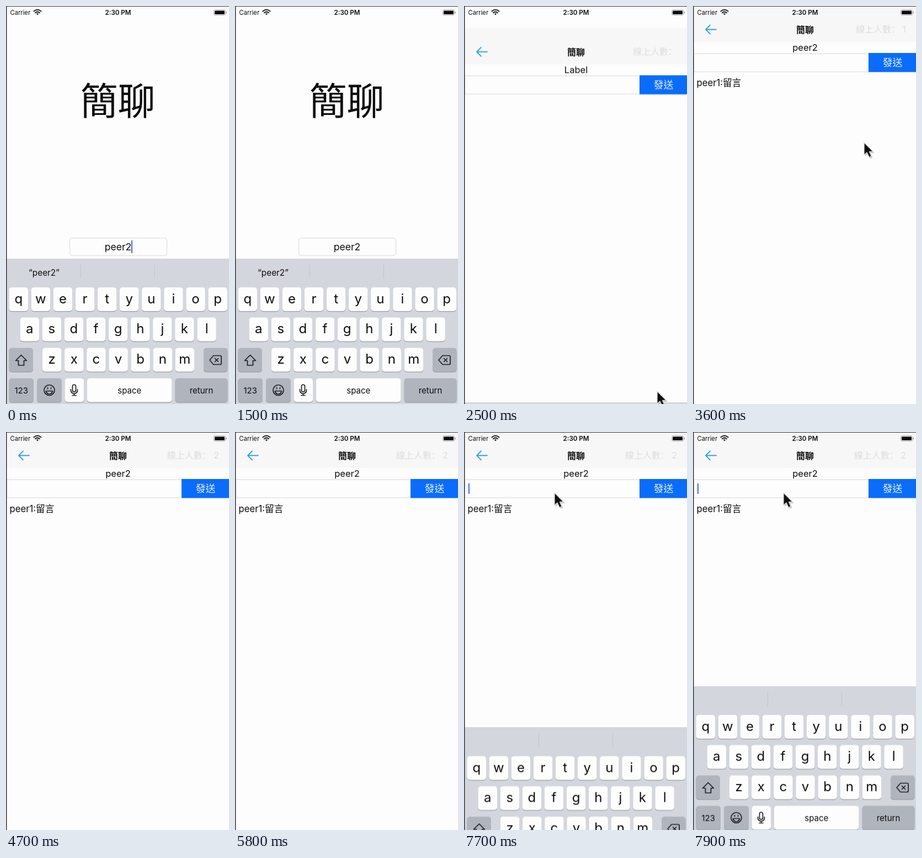
An HTML page for the animation above (8 s loop, 404x720 px).

```html
<!DOCTYPE html>
<html lang="zh-Hant">
<head>
<meta charset="utf-8">
<title>Chat demo</title>
<style>
  html, body { margin: 0; width: 100%; height: 100%; overflow: hidden; background: #fdfdfd; }
  svg { display: block; width: 100vw; height: 100vh; }
  text { font-family: Inter, "Noto Sans CJK TC", "Noto Sans CJK", sans-serif; fill: #0c0c0e; }
  .mid { text-anchor: middle; }
  .paper { fill: #fdfdfd; }
  .field { fill: #fdfdfd; stroke: #e4e4e8; stroke-width: 1.5; }
  .caret { fill: #4a66dc; }
  .line { fill: none; stroke: #1c1d20; stroke-width: 1.7; stroke-linecap: round; stroke-linejoin: round; }
  .count { font-family: Inter, "Noto Sans CJK SC", "Noto Sans CJK", sans-serif; font-size: 16px; text-anchor: end; fill: #dddde0; }

  /* One shared 8 s clock */
  .anim { animation: 8s linear infinite; }
  .step { animation: 8s step-end infinite; }
  #page { animation-name: page; }
  #keyboard { animation-name: keyboard; }
  #pointer { animation-name: pointer; }
  #hint { animation-name: hint; }
  #label { animation-name: until-joined; }
  #name { animation-name: after-joined; }
  #message { animation-name: message; }
  #count0 { animation-name: until-joined; }
  #count1 { animation-name: one-online; }
  #count2 { animation-name: two-online; }
  #chatCaret { animation-name: focused; }
  #loginCaret { animation: blink 1s step-end infinite; }

  @keyframes page {
    0%, 27.25% { transform: translateY(720px); animation-timing-function: cubic-bezier(.333, 1, .667, 1); }
    33.75%, 100% { transform: translateY(0); }
  }
  @keyframes keyboard {
    0%, 27.25% { transform: translateY(0); animation-timing-function: cubic-bezier(.333, 1, .667, 1); }
    32.625% { transform: translateY(264px); }
    94.375% { transform: translateY(264px); animation-timing-function: cubic-bezier(.333, 1, .667, 1); }
    100% { transform: translateY(0); }
  }
  @keyframes pointer {
    0%, 20% { transform: translate(420px, 560px); animation-timing-function: ease-out; }
    23.75%, 32.5% { transform: translate(350px, 697px); animation-timing-function: ease-in-out; }
    45% { transform: translate(310px, 247px); animation-timing-function: ease-in; }
    50% { transform: translate(420px, 200px); }
    81.25% { transform: translate(420px, 190px); animation-timing-function: ease-out; }
    87.5%, 100% { transform: translate(164px, 110px); }
  }
  @keyframes hint { 0% { opacity: 1; } 33%, 100% { opacity: 0; } }
  @keyframes until-joined { 0% { opacity: 1; } 35%, 100% { opacity: 0; } }
  @keyframes after-joined { 0% { opacity: 0; } 35%, 100% { opacity: 1; } }
  @keyframes message { 0% { opacity: 0; } 36.25%, 100% { opacity: 1; } }
  @keyframes one-online { 0% { opacity: 0; } 35% { opacity: 1; } 57.5%, 100% { opacity: 0; } }
  @keyframes two-online { 0% { opacity: 0; } 57.5%, 100% { opacity: 1; } }
  @keyframes focused { 0% { opacity: 0; } 94.375%, 100% { opacity: 1; } }
  @keyframes blink { 0% { opacity: 1; } 50%, 100% { opacity: 0; } }
</style>
</head>
<body>
<svg viewBox="0 0 404 720" preserveAspectRatio="none">
  <rect class="paper" width="404" height="720"/>

  <g id="login">
    <text class="mid" x="202.5" y="197" font-size="68" font-weight="500">簡聊</text>
    <rect class="field" x="115.5" y="419.5" width="176" height="32" rx="5"/>
    <text class="mid" x="203" y="442" font-size="17.5">peer2</text>
    <rect id="loginCaret" class="caret" x="227" y="424" width="2" height="23"/>
  </g>

  <g id="page" class="anim">
    <rect class="paper" width="404" height="720"/>
    <rect width="404" height="65" fill="#f7f7f8"/>
    <path d="M42 42.5H23M31 34.5L23 42.5L31 50.5" fill="none" stroke="#35a0dc" stroke-width="1.8" stroke-linecap="round" stroke-linejoin="round"/>
    <text class="mid" x="203" y="48.5" font-size="16" font-weight="700">簡聊</text>
    <g lang="zh-Hans">
      <text id="count0" class="count step" x="386" y="48">線上人數：</text>
      <text id="count1" class="count step" x="386" y="48">線上人數： 1</text>
      <text id="count2" class="count step" x="386" y="48">線上人數： 2</text>
    </g>
    <text id="label" class="mid step" x="203" y="80.5" font-size="16.5">Label</text>
    <text id="name" class="mid step" x="203" y="80.5" font-size="16.5">peer2</text>
    <rect class="field" x="1.5" y="86" width="317" height="33"/>
    <rect x="318" y="85" width="86" height="34.5" fill="#0a6cfa"/>
    <text class="mid" x="361.5" y="109" font-size="18" style="fill:#e4f2ff">發送</text>
    <rect id="chatCaret" class="caret step" x="8" y="93" width="2" height="19"/>
    <text id="message" class="step" x="6.5" y="144.5" font-size="16.7">peer1:留言</text>
  </g>

  <g id="status">
    <text x="7.5" y="16" font-size="11.2">Carrier</text>
    <g class="line">
      <path d="M50.5 9.5Q57 4 63.5 9.5" stroke-width="2"/>
      <path d="M53 12.3Q57 9 61 12.3" stroke-width="2"/>
    </g>
    <path d="M54.8 14L57 16.5L59.2 14Q57 12.4 54.8 14Z" fill="#1c1d20"/>
    <text class="mid" x="203" y="16" font-size="11.6" font-weight="600">2:30 PM</text>
    <rect x="376.5" y="7" width="21" height="9.5" rx="2.5" fill="none" stroke="#a4a4a8"/>
    <rect x="378" y="8.5" width="18" height="6.5" rx="1.2" fill="#0c0c0e"/>
    <rect x="398.5" y="10" width="1.5" height="3.5" fill="#a4a4a8"/>
  </g>

  <g id="keyboard" class="anim">
    <rect y="457" width="404" height="264" fill="#d3d6dc"/>
    <path d="M135.5 468V493M269.5 468V493" stroke="#c3c6cd"/>
    <text id="hint" class="mid step" x="69" y="487.5" font-size="15.3">“peer2”</text>
    <g id="keys"></g>
    <g class="line">
      <path d="M27.5 631.5L37.5 641.5H32.5V650H22.5V641.5H17.5Z"/>
      <path d="M369 640.5L376 632.5H388Q390 632.5 390 634.5V646.5Q390 648.5 388 648.5H376ZM378.5 637.5L384.5 643.5M384.5 637.5L378.5 643.5"/>
      <circle cx="78.5" cy="695" r="9.5"/>
      <path d="M72.5 696.5H84.5Q83.5 702 78.5 702T72.5 696.5ZM75.5 690.5V692.5M81.5 690.5V692.5"/>
      <rect x="120.5" y="685" width="6" height="13" rx="3"/>
      <path d="M117.5 693.5V695Q117.5 701 123.5 701T129.5 695V693.5M123.5 701V704.5M120 704.5H127"/>
    </g>
  </g>

  <path d="M.75 0V720" stroke="#38383a" stroke-width="1.5"/>
  <path d="M0 .5H404" stroke="#38383a"/>

  <g id="pointer" class="anim">
    <path d="M2 3V25L7 20.5L11 29L15.5 27L12 19H19Z" fill="#808084" opacity=".45"/>
    <path d="M0 0V22.5L5 18L9 26.5L13 24.5L9.5 16.5H16.5Z" fill="#101012" stroke="#dcdcde" stroke-width="1.3" stroke-linejoin="round"/>
  </g>
</svg>

<script>
  const NS = "http://www.w3.org/2000/svg";
  const keys = document.getElementById("keys");

  function add(tag, attrs, text = "") {
    const node = document.createElementNS(NS, tag);
    for (const name in attrs) node.setAttribute(name, attrs[name]);
    node.textContent = text;
    keys.append(node);
  }

  function addKey(x, y, width, label = "", { dark = false, size = 15 } = {}) {
    const box = { x, width, height: 43, rx: 5 };
    add("rect", { ...box, y: y + 1.3, fill: "#9a9da4" });
    add("rect", { ...box, y, fill: dark ? "#b0b4bd" : "#fdfdfd" });
    add("text", { class: "mid", x: x + width / 2, y: y + (size > 20 ? 28.5 : 27), "font-size": size }, label);
  }

  const rows = [["qwertyuiop", 5.5, 509], ["asdfghjkl", 25.5, 563.5], ["zxcvbnm", 66, 618.5]];
  for (const [letters, left, y] of rows) {
    [...letters].forEach((letter, i) => addKey(left + i * 40.1, y, 34.5, letter, { size: 24 }));
  }

  const dark = { dark: true };
  addKey(5.5, 618.5, 43.5, "", dark);
  addKey(358, 618.5, 43.5, "", dark);
  addKey(5.5, 673.5, 44.5, "123", dark);
  addKey(56, 673.5, 45, "", dark);
  addKey(106.5, 673.5, 34.5);
  addKey(147, 673.5, 153.5, "space");
  addKey(306.5, 673.5, 95, "return", dark);
</script>
</body>
</html>
```
